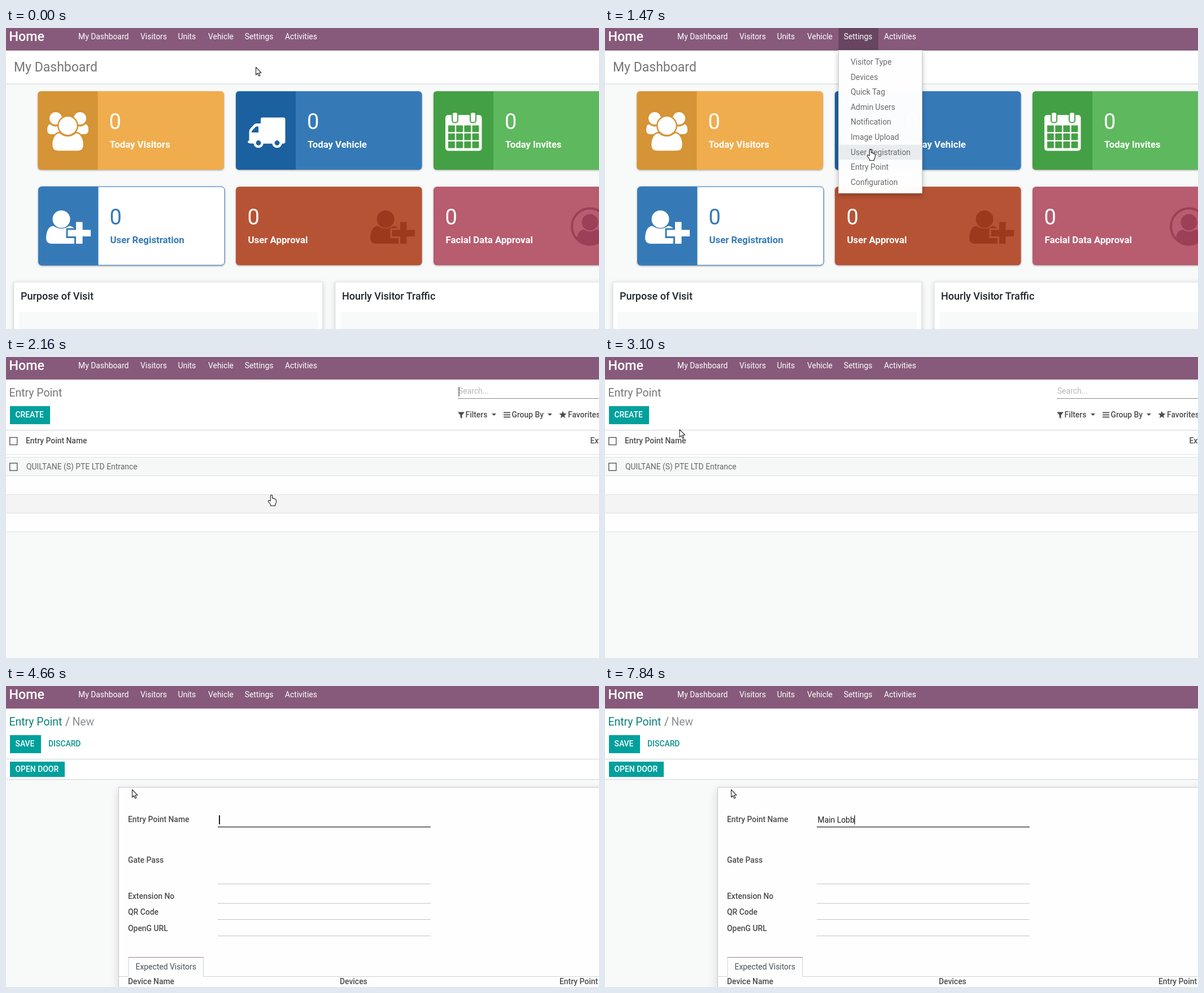
An HTML page for the animation above (8 s loop, 1050 by 533 pixels).

```html
<!DOCTYPE html>
<html lang="en">
<head>
<meta charset="utf-8">
<title>Entry point setup</title>
<style>
  html, body { margin: 0; width: 100%; height: 100%; overflow: hidden; background: #f9fafa; }
  svg { display: block; width: 100%; height: 100%; font-family: Roboto, "Open Sans", sans-serif; }
  text { white-space: pre; }
  .card { filter: drop-shadow(0 1px 1.5px rgba(0, 0, 0, .35)); }
  .panel { filter: drop-shadow(0 2px 4px rgba(0, 0, 0, .16)); }
  .menu { filter: drop-shadow(0 4px 5px rgba(0, 0, 0, .25)); }
</style>
</head>
<body>
<svg id="stage" viewBox="0 0 1050 533"></svg>
<script>
const LOOP = 8000, BASE = 13.9, ROW = 26.6, MENU_TOP = 47;
const TEAL = '#00a09d', GREY = '#4c4c4c', LINE = '#ced4da';

const text = (x, y, str, fill = GREY, size = BASE, weight = 400, id = '') =>
  `<text x="${x}" y="${y}" fill="${fill}" font-size="${size}" font-weight="${weight}" id="${id}">${str}</text>`;
const bold = (x, y, str, fill = GREY, size = BASE) => text(x, y, str, fill, size, 500);
const rect = (x, y, w, h, fill, extra = '') =>
  `<rect x="${x}" y="${y}" width="${w}" height="${h}" fill="${fill}" ${extra}/>`;
const circle = (x, y, r, fill, extra = '') => `<circle cx="${x}" cy="${y}" r="${r}" fill="${fill}" ${extra}/>`;
const path = (d, fill, extra = '') => `<path d="${d}" fill="${fill}" ${extra}/>`;
const rule = (y, x = 0, w = 1050, fill = LINE, h = 1) => rect(x, y, w, h, fill);
const group = (id, body, extra = '') => `<g id="${id}" ${extra}>${body}</g>`;

// Icons
function usersIcon(back) {
  const side = circle(88, 160, 11, '#fff') +
    path('M78 170.500Q88 178 97 171V188H79Q73 187 73 181Q73 171 78 170.500Z', '#fff');
  const gap = `stroke="${back}" stroke-width="2.500"`;
  return side + `<g transform="matrix(-1 0 0 1 219 0)">${side}</g>` +
    path('M95 185Q109 197 124 185C134 186 138 197 138 207Q138 218.500 127 218.500H92Q81 218.500 81 207C81 197 85 186 95 185Z', '#fff', gap) +
    circle(109.5, 173, 17.3, '#fff', gap);
}

function truckIcon(back) {
  const wheels = [447, 480].map(x => circle(x, 203.5, 8.8, '#fff') + circle(x, 203.5, 4.4, back)).join('');
  return rect(451, 158.5, 43.5, 46, '#fff', 'rx="3"') +
    path('M454 169H444Q441 169 439 171L432 179Q430.500 181 430.500 184V199Q428 200 428 202Q429 204.500 433 204.500H492V199H454Z', '#fff') +
    path('M435 185V182.500L442.500 174.500H447V185Z', back) + wheels;
}

function calendarIcon(back) {
  let s = rect(778, 154, 64.5, 63.5, '#fff', 'rx="5"');
  for (let i = 0; i < 12; i++) s += rect(783 + i % 4 * 14.2, 172.5 + Math.floor(i / 4) * 14.2, 11.8, 11.8, back);
  return s + [795, 827].map(x =>
    rect(x - 5, 149, 10, 18.5, '#fff', `rx="4" stroke="${back}" stroke-width="2"`)).join('');
}

function userPlusIcon(fill, back, dx = 0) {
  const plus = 'M124 343.500H135.500V357.500H150V369H135.500V382H124V369H109.500V357.500H124Z';
  return `<g transform="translate(${dx})">` +
    path('M84 350.500Q98 360 112 350.500Q124 352 126 366V376Q125 382 117 382H80Q71 381 71 372Q72 351 84 350.500Z', fill) +
    circle(98, 338.5, 15.5, fill) +
    path(plus, back, `stroke="${back}" stroke-width="6"`) + path(plus, fill) + '</g>';
}

function faceIcon(fill) {
  return circle(1034, 351.5, 32, 'none', `stroke="${fill}" stroke-width="4"`) + circle(1034, 344, 14.5, fill) +
    path('M1011 372Q1013 358 1023 357Q1034 364 1045 357Q1055 358 1057 372Q1034 396 1011 372Z', fill);
}

function card(x, y, label, main, side, icon, ink = '#fff') {
  const tx = x + (side ? 127 : 21.5);
  const left = side ? path(`M${x + 6} ${y}H${x + 106}V${y + 139}H${x + 6}Q${x} ${y + 139} ${x} ${y + 133}V${y + 6}Q${x} ${y} ${x + 6} ${y}Z`, side) : '';
  const border = ink === '#fff' ? '' : `stroke="${ink}"`;
  return `<g class="card">${rect(x, y, 329.5, 139, main, `rx="6" ${border}`)}</g>` + left + icon +
    text(tx - 1, y + 67, '0', ink, 38) + text(tx, y + 100, label, ink, 16.8, 700);
}

// Pages
function panel(x, title) {
  return `<g class="panel">${rect(x, 450, 546.5, 120, '#fff', 'stroke="#dee2e6"')}</g>` +
    rect(x + 9, 503, 529, 40, '#f8f9f9') + bold(x + 12, 481, title, '#212529', 18);
}

const dashboard = rect(0, 39, 1050, 60, '#fff') + rule(98.5) + text(14, 77, 'My Dashboard', '#757575', 23) +
  card(56.5, 112, 'Today Visitors', '#f0ad4e', '#d59435', usersIcon('#d59435')) +
  card(407, 112, 'Today Vehicle', '#357ab7', '#1b61a0', truckIcon('#1b61a0')) +
  card(757, 112, 'Today Invites', '#5eb85e', '#44a044', calendarIcon('#44a044')) +
  card(57.5, 281, 'User Registration', '#fff', '#357ab7', userPlusIcon('#fff', '#357ab7'), '#357ab7') +
  card(407, 281, 'User Approval', '#b75335', '', userPlusIcon('#9c391c', '#b75335', 574)) +
  card(757, 281, 'Facial Data Approval', '#b85c70', '', faceIcon('#9b4056')) +
  panel(14, 'Purpose of Visit') + panel(583, 'Hourly Visitor Traffic');

const arrowDown = x => path(`M${x} 100h8l-4 4Z`, GREY);
const checkbox = y => rect(6.75, y, 13, 13, '#fff', 'stroke="#555" stroke-width="1.400"');
const star = Array.from({ length: 10 }, (_, i) => {
  const a = i * Math.PI / 5, r = i % 2 ? 3 : 7;
  return `${986 + r * Math.sin(a)},${102.5 - r * Math.cos(a)}`;
}).join(' ');

const list = rect(0, 39, 1050, 138, '#fff') + text(5.5, 70, 'Entry Point', '#777', 19.4) +
  rect(7, 87, 71, 32, TEAL, 'id="create"') + bold(16.5, 107, 'CREATE', '#fff') +
  text(801, 65, 'Search...', '#b8b8b8') + rect(801.5, 53, 1, 17, '#222', 'id="searchCaret"') +
  rule(73, 800, 250, '#888') +
  path('M800 97.500H812L807.500 103V109L804.500 107V103Z', GREY) + bold(813.5, 107, 'Filters') + arrowDown(860) +
  [98, 102, 106].map(y => rect(881, y - .5, 12, 1.8, GREY)).join('') + bold(895.5, 107, 'Group By') + arrowDown(959) +
  `<polygon points="${star}" fill="${GREY}"/>` + bold(995, 107, 'Favorites') +
  rule(129) + checkbox(142.5) + bold(35, 153, 'Entry Point Name') + bold(1034.5, 153, 'External') + rule(172, 0, 1050, '#dee2e6') +
  rect(0, 177, 1050, 33, '#f6f7f7') + rect(0, 211, 1050, 32, '#fefefe') +
  rect(0, 244, 1050, 32, '#f4f4f4') + rect(0, 277, 1050, 32, '#fefefe') +
  [177, 210, 243, 276, 309].map(y => rule(y, 0, 1050, '#dee2e6')).join('') +
  checkbox(188) + text(36, 198.5, 'QUILTANE (S) PTE LTD Entrance', '#666');

const labels = [['Entry Point Name', 241], ['Gate Pass', 312.5], ['Extension No', 376.5], ['QR Code', 405], ['OpenG URL', 433.5]];
const form = rect(0, 39, 1050, 127, '#fff') + text(5.5, 70, 'Entry Point', '#0b7f7b', 19.4) +
  text(105, 70, '/', '#777', 19.4) + text(117.5, 70, 'New', '#8a8f94', 19.4) +
  rect(7, 87, 55, 32, TEAL) + bold(16.5, 107, 'SAVE', '#fff') + bold(75, 107, 'DISCARD', '#0b918e') +
  rule(129) + rect(7, 134, 97, 27, TEAL) + bold(16.5, 152, 'OPEN DOOR', '#fff') + rule(165) +
  `<g style="filter:drop-shadow(0 5px 8px rgba(0,0,0,.14))">${rect(199.5, 179.5, 870, 380, '#fefefe', 'stroke="#c8c8d3"')}</g>` +
  labels.map(([str, y]) => bold(216, y, str)).join('') +
  rule(248.7, 375, 377, '#5c5c60', 1.8) + [350, 384.5, 413, 442].map(y => rule(y, 375, 377, '#c4c4c4')).join('') +
  path('M200 514.500H217V480.500M349.500 480.500V514.500H1050', 'none', `stroke="${LINE}"`) +
  rule(480, 216.5, 133.5, '#a07f97') + text(229.5, 502, 'Expected Visitors', '#495057') +
  bold(216, 528, 'Device Name') + bold(591, 528, 'Devices') + bold(980, 528, 'Entry Point') +
  text(376.5, 242, '', '#222', BASE, 400, 'typed') + rect(377, 229, 1.3, 16, '#000', 'id="caret"');

const navItems = [['My Dashboard', 128], ['Visitors', 238], ['Units', 304.5], ['Vehicle', 358], ['Settings', 422.7], ['Activities', 494]];
const nav = rect(0, 0, 1050, 39.5, '#875a7b') + rule(38.7, 0, 1050, '#77506d') +
  rect(413.5, 0, 70.5, 39.5, '#684560', 'id="active"') +
  text(5.5, 23, 'Home', '#fff', 23.3, 500) + navItems.map(([str, x]) => text(x, 19.7, str, '#fff')).join('');

const menuItems = ['Visitor Type', 'Devices', 'Quick Tag', 'Admin Users', 'Notification', 'Image Upload', 'User Registration', 'Entry Point', 'Configuration'];
const menu = `<g class="menu">${rect(413.5, 39.5, 148, 253, '#fff', 'stroke="#ccc" opacity=".985"')}</g>` +
  rect(414, 0, 147, ROW, '#e9ecef', 'id="hover"') +
  menuItems.map((str, i) => text(435, 65 + i * ROW, str, '#6a6a6a')).join('');

const outline = 'stroke="#222" stroke-width="1.100" stroke-linejoin="round"';
const cursors = group('cursor',
  path('M.5 .5V14L3.600 11.200L5.700 16L7.900 15L5.800 10.300H10Z', '#fff', `id="arrow" ${outline}`) +
  path('M-1.600 11V1.500Q-1.500 .4 0 .4Q1.500 .4 1.500 1.500V6Q4 5.600 4.500 7Q6.300 6.600 6.600 7.800Q8.400 7.800 8.400 9.500V13Q8 16 6.500 17.500V19.500H-1.500V17.500L-5.500 12Q-6 10 -4.200 9.900Z', '#fff', `id="hand" ${outline}`));

document.getElementById('stage').innerHTML = rect(0, 0, 1050, 533, '#f8f9f9') +
  group('dashboard', dashboard) + group('list', list) + group('form', form) + nav + group('menu', menu) + cursors;

const el = id => document.getElementById(id);
const show = (id, on) => el(id).setAttribute('visibility', on ? 'inherit' : 'hidden');
const within = (t, from, to) => t >= from && t < to;

// Pointer moves: first change, last change, number of changes, end point
const moves = [
  [150, 380, 4, 445, 20], [620, 700, 2, 444, 32], [1080, 1470, 6, 470, 215],
  [1548, 1780, 4, 470, 244], [2480, 3270, 11, 56, 102], [3720, 4200, 7, 223, 183]
];

function pointer(t) {
  let x = 442, y = 69;
  for (const [start, end, steps, toX, toY] of moves) {
    if (t < start) break;
    const step = t >= end ? steps : Math.floor((t - start) / (end - start) * (steps - 1)) + 1;
    const p = step / steps, e = p * p * (3 - 2 * p);
    x += (toX - x) * e;
    y += (toY - y) * e;
  }
  return [x, y];
}

const typing = [[0, ''], [4810, 'M'], [5440, 'Ma'], [5590, 'Mai'], [5820, 'Main'], [6210, 'Mai'], [6770, 'Main'],
  [6920, 'Main '], [7240, 'Main L'], [7460, 'Main Lo'], [7780, 'Main Lob'], [7840, 'Main Lobb']];
const caretOff = [[4120, 4660], [5360, 5440], [6370, 6770]];

function draw(t) {
  const [x, y] = pointer(t);
  const open = within(t, 620, 2020);
  show('dashboard', t < 2090);
  show('list', within(t, 2090, 3500));
  show('form', t >= 3500);
  show('menu', open);
  show('active', t < 2020 && (open || y < 39.5));

  const row = Math.floor((y - MENU_TOP) / ROW);
  show('hover', open && row >= 0);
  el('hover').setAttribute('y', MENU_TOP + row * ROW);

  const overCreate = x < 78 && y > 86 && y < 119;
  el('create').setAttribute('fill', overCreate ? '#008784' : TEAL);
  show('searchCaret', within(t, 2090, 3500) && !within(t, 2640, 3170));

  const typed = typing.findLast(([at]) => t >= at)[1];
  el('typed').textContent = typed;
  el('caret').setAttribute('x', typed ? 376.2 + el('typed').getComputedTextLength() : 377);
  el('caret').setAttribute('width', typed ? 1.2 : 1.8);
  show('caret', t >= 3500 && !caretOff.some(([from, to]) => within(t, from, to)));

  const hand = t < 2480 ? y < 39.5 || t >= 620 : overCreate;
  show('hand', hand);
  show('arrow', !hand);
  el('cursor').setAttribute('transform', `translate(${x} ${y})`);
}

function frame() {
  draw(performance.now() % LOOP);
  requestAnimationFrame(frame);
}
frame();
</script>
</body>
</html>
```
